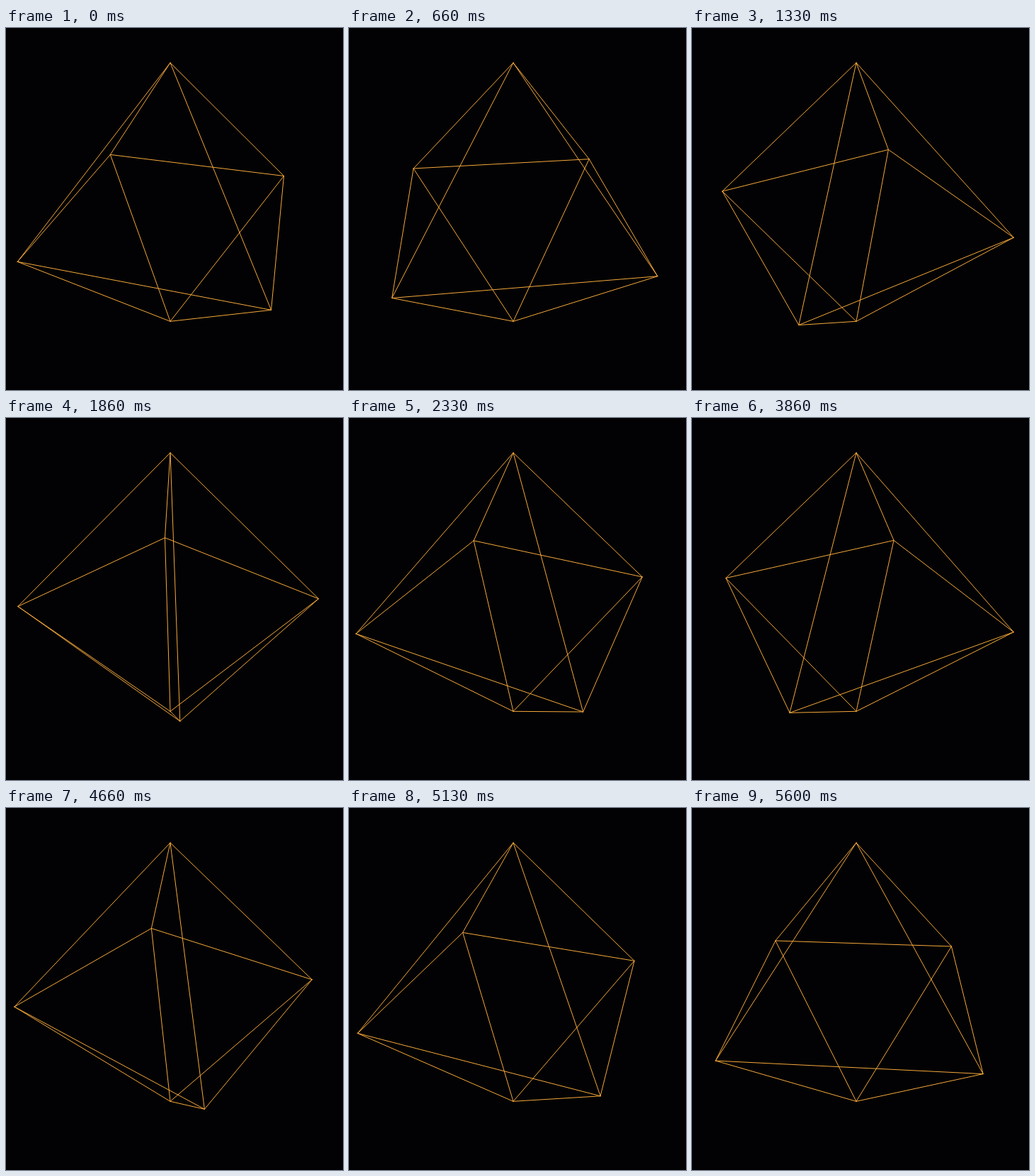
An HTML page with a canvas for the animation above (5.66 s loop, 476 px wide and 510 px high).

```html
<!DOCTYPE html>
<html lang="en">
<head>
<meta charset="utf-8">
<title>Spinning octahedron</title>
<style>
  html, body { margin: 0; width: 100%; height: 100%; overflow: hidden; background: #020204; }
  canvas { display: block; }
</style>
</head>
<body>
<canvas id="stage" width="476" height="510"></canvas>
<script>
const ctx = document.getElementById('stage').getContext('2d');
const LOOP = 5660;
const CENTER = { x: 232, y: 260 };
const TOP = [232, 49], BOTTOM = [232, 413.3];
const RX = 212.5, RY = 118.2, DEPTH = 0.294;

// [step, degrees]: a nearly even spin with slight changes of pace
const SPIN = [[0, 30], [9, 49.4], [20, 74.1], [27, 90.2], [35, 109.6],
              [45, 132.6], [58, 161.4], [70, 189.3], [84, 221]];

// Steps last 60, 70, 70 ms in turn
const stepAt = ms => Math.ceil(3 * (Math.floor(ms / 10) + 1) / 20) - 1;

function angleAt(step) {
  const i = Math.max(1, SPIN.findIndex(([s]) => s >= step));
  const [s0, a0] = SPIN[i - 1], [s1, a1] = SPIN[i];
  return a0 + (a1 - a0) * (step - s0) / (s1 - s0);
}

// Perspective view of a point on the equator; 0 degrees faces the viewer
function project(deg) {
  const a = deg * Math.PI / 180;
  const w = 1 - DEPTH * Math.cos(a);
  return [CENTER.x + RX * Math.sin(a) / w, CENTER.y + RY * Math.cos(a) / w];
}

function line(from, to) {
  ctx.beginPath();
  ctx.moveTo(...from);
  ctx.lineTo(...to);
  ctx.stroke();
}

function draw(step) {
  ctx.fillStyle = '#020204';
  ctx.fillRect(0, 0, 476, 510);
  ctx.strokeStyle = '#f5a83a';
  ctx.lineWidth = 1;
  ctx.lineCap = 'round';
  const angle = angleAt(step);
  const ring = [0, 90, 180, 270].map(d => project(angle + d));
  ring.forEach((p, i) => {
    line(TOP, p);
    line(BOTTOM, p);
    line(p, ring[(i + 1) % 4]);
  });
}

const start = performance.now();
let shown = -1;
function tick() {
  const step = stepAt((performance.now() - start) % LOOP);
  if (step !== shown) draw(shown = step);
  requestAnimationFrame(tick);
}
tick();
</script>
</body>
</html>
```
